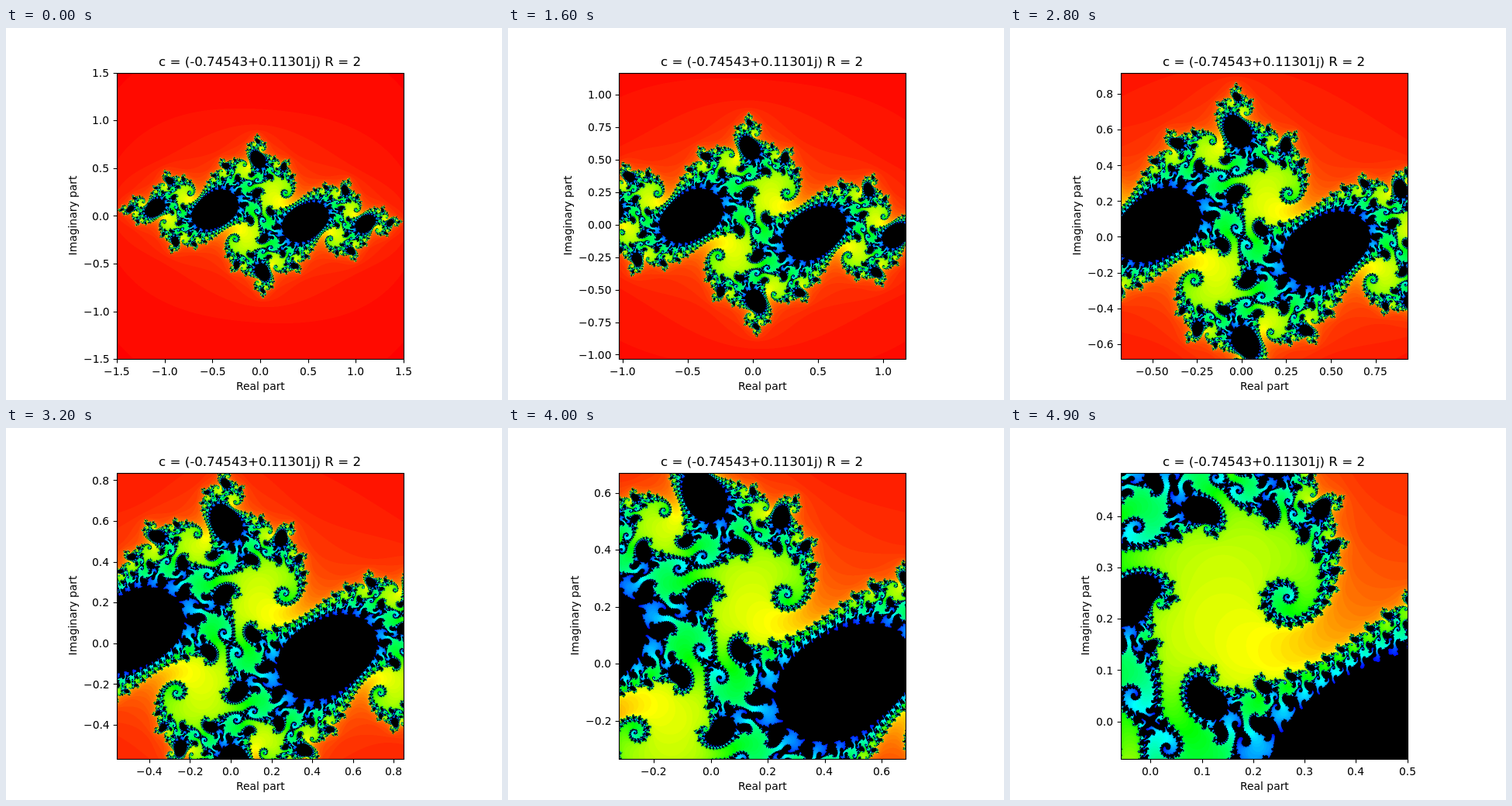
These frames come from a looping animation (640 px wide and 480 px high, 5 s). An HTML page with a canvas:

```html
<!DOCTYPE html>
<html>
<head>
<meta charset="utf-8">
<title>Julia set zoom</title>
<style>
html, body { margin: 0; width: 100%; height: 100%; overflow: hidden; background: #fff; }
canvas { display: block; }
</style>
</head>
<body>
<canvas id="stage" width="640" height="480"></canvas>
<script>
const ctx = document.getElementById('stage').getContext('2d');
const STEPS = 50, STEP_MS = 100;
const CR = -0.74543, CI = 0.11301, R = 2, MAX_ITER = 100;
const BOX = { left: 143.2, top: 57.6, size: 369.6 };
const PX = 143, PY = 58, SIDE = 370;
const BOTTOM = BOX.top + BOX.size;
const FONT = '"DejaVu Sans", sans-serif';

const pixels = ctx.createImageData(SIDE, SIDE);
const cache = [];

// Hue runs from red to blue; points that never escape are black.
const red = new Uint8Array(MAX_ITER + 1);
const green = new Uint8Array(MAX_ITER + 1);
const blue = new Uint8Array(MAX_ITER + 1);
for (let i = 0; i < MAX_ITER; i++) {
  const h = 4 * i / MAX_ITER;
  const ramp = k => Math.round(255 * Math.min(1, Math.max(0, 2 - Math.abs(h - k))));
  red[i] = ramp(0);
  green[i] = ramp(2);
  blue[i] = ramp(4);
}

function viewAt(step) {
  const f = step / 60;
  const mix = (a, b) => a + (b - a) * f;
  return { x0: mix(-1.5, 0.266), x1: mix(1.5, 0.276), y0: mix(-1.5, 0.247), y1: mix(1.5, 0.257) };
}

function escapeTime(x, y) {
  let i = 0, xx = x * x, yy = y * y;
  while (i < MAX_ITER && xx + yy <= R * R) {
    y = 2 * x * y + CI;
    x = xx - yy + CR;
    xx = x * x;
    yy = y * y;
    i++;
  }
  return i;
}

// Each pixel is the mean of a 2 by 2 grid of samples.
function drawFractal(v) {
  const out = pixels.data;
  const dx = (v.x1 - v.x0) / BOX.size, dy = (v.y1 - v.y0) / BOX.size;
  for (let row = 0, p = 0; row < SIDE; row++) {
    const ya = v.y1 - (PY + row + 0.25 - BOX.top) * dy, yb = ya - dy / 2;
    for (let col = 0; col < SIDE; col++, p += 4) {
      const xa = v.x0 + (PX + col + 0.25 - BOX.left) * dx, xb = xa + dx / 2;
      const a = escapeTime(xa, ya), b = escapeTime(xb, ya);
      const c = escapeTime(xa, yb), d = escapeTime(xb, yb);
      out[p] = (red[a] + red[b] + red[c] + red[d]) / 4;
      out[p + 1] = (green[a] + green[b] + green[c] + green[d]) / 4;
      out[p + 2] = (blue[a] + blue[b] + blue[c] + blue[d]) / 4;
      out[p + 3] = 255;
    }
  }
  ctx.putImageData(pixels, PX, PY);
}

function ticks(lo, hi, bins) {
  const raw = (hi - lo) / bins;
  const mag = 10 ** Math.floor(Math.log10(raw));
  const lead = [1, 2, 2.5, 5, 10].find(s => s * mag >= raw - 1e-9);
  const step = lead * mag, out = [];
  for (let k = Math.ceil(lo / step - 1e-9); k * step <= hi + 1e-9; k++) {
    const label = Math.abs(k * step).toFixed(lead === 2.5 ? 2 : 1);
    out.push({ value: k * step, label: (k < 0 ? '\u2212' : '') + label });
  }
  return out;
}

const snap = n => Math.round(n) + 0.5;

function line(x0, y0, x1, y1) {
  ctx.beginPath();
  ctx.moveTo(x0, y0);
  ctx.lineTo(x1, y1);
  ctx.stroke();
}

// Text starts on a whole pixel; anchor is 0.5 for centred, 1 for right-aligned.
function text(str, x, y, anchor = 0.5, size = 13.89) {
  ctx.font = size + 'px ' + FONT;
  const width = ctx.measureText(str).width;
  ctx.fillText(str, Math.round(x - width * anchor), Math.round(y));
  return width;
}

function drawAxes(v) {
  const left = snap(BOX.left), base = snap(BOTTOM);
  ctx.fillStyle = ctx.strokeStyle = '#000';
  ctx.lineWidth = 1.11;
  ctx.strokeRect(left, snap(BOX.top), SIDE, base - snap(BOX.top));

  for (const t of ticks(v.x0, v.x1, 8)) {
    const x = BOX.left + (t.value - v.x0) / (v.x1 - v.x0) * BOX.size;
    line(snap(x), base, snap(x), base + 4.86);
    text(t.label, x, 448);
  }

  let widest = 0;
  for (const t of ticks(v.y0, v.y1, 9)) {
    const y = BOTTOM - (t.value - v.y0) / (v.y1 - v.y0) * BOX.size;
    line(left, snap(y), left - 4.86, snap(y));
    widest = Math.max(widest, text(t.label, 133.5, y + 5.2, 1));
  }

  text('Real part', 328, 467);
  ctx.save();
  ctx.translate(Math.round(124.5 - widest), 242.4);
  ctx.rotate(-Math.PI / 2);
  text('Imaginary part', 0, 0);
  ctx.restore();
  text('c = (-0.74543+0.11301j) R = 2', 328, 49, 0.5, 16.67);
}

function render(step) {
  if (cache[step]) {
    ctx.drawImage(cache[step], 0, 0);
    return;
  }
  const v = viewAt(step);
  ctx.fillStyle = '#fff';
  ctx.fillRect(0, 0, 640, 480);
  drawFractal(v);
  drawAxes(v);
  const copy = document.createElement('canvas');
  copy.width = 640;
  copy.height = 480;
  copy.getContext('2d').drawImage(ctx.canvas, 0, 0);
  cache[step] = copy;
}

let start = null, shown = -1;
function tick(now) {
  if (start === null) start = now;
  const step = Math.floor((now - start) / STEP_MS) % STEPS;
  if (step !== shown) render(shown = step);
  requestAnimationFrame(tick);
}
render(0);
requestAnimationFrame(tick);
</script>
</body>
</html>
```
